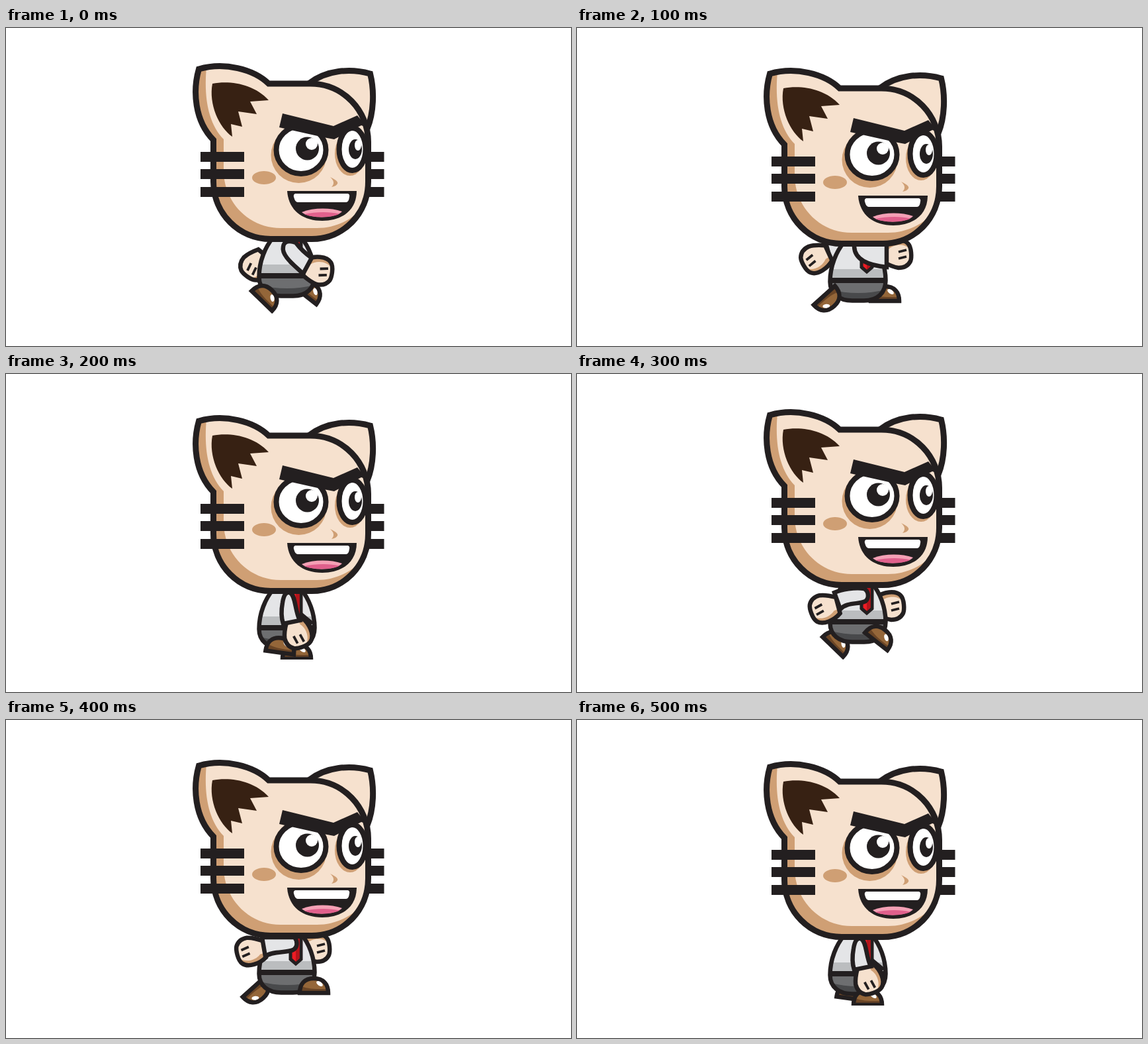
Recreate the animation shown at these times as an HTML page. Size 854 by 480 pixels, loop 600 ms.

```html
<!DOCTYPE html>
<html lang="en">
<head>
<meta charset="utf-8">
<title>Walking cat</title>
<style>
  html, body { margin: 0; width: 100%; height: 100%; overflow: hidden; background: #fff; }
  svg { display: block; width: 100%; height: 100%; }
  .ink { fill: #231f20; }
  .skin { fill: #f6e1ce; }
  .tan { fill: #cf9f74; }
  .shirt { fill: #e4e5e7; }
  .grey { fill: #bbbdbf; }
  .white { fill: #fff; }
  .line { stroke: #231f20; stroke-width: 6.5; }
  .thick { stroke: #231f20; stroke-width: 9; }
  .none { fill: none; }
</style>
</head>
<body>
<svg viewBox="0 0 854 480">
  <defs>
    <clipPath id="floor"><path d="M0 0H854V431H0Z"/></clipPath>
    <path id="eggShape" d="M404 316C392 330 382.500 352 382.500 376C382.500 394 396 404.500 416 404.500H434C454 404.500 466.500 393 466.500 374C466.500 352 458 330 446 316Z"/>
    <clipPath id="egg"><use href="#eggShape"/></clipPath>
    <path id="headShape" d="M397 84H460C510 84 547.500 125 547.500 172V232C547.500 280 510 318.500 462 318.500H400C352 318.500 313.500 280 313.500 232V169C285 140 282 95 291.500 62C330 51 374 62 397 84Z"/>
    <clipPath id="headClip"><use href="#headShape"/></clipPath>

    <g id="shoe">
      <path fill="#946639" d="M3-3C3-16 10-25 24-25C39-25 46-16 46-3Z"/>
      <path fill="#6a4526" d="M3-3C3-8 4-11 6-13C18-8 33-9 46-9V-3Z"/>
      <path class="line none" d="M3-3C3-16 10-25 24-25C39-25 46-16 46-3Z"/>
      <ellipse class="white" cx="33" cy="-17" rx="5.500" ry="3" transform="rotate(35 33 -17)"/>
    </g>

    <path id="fistShape" d="M-21-13C-10-21 8-24 16-16C22-10 22 6 20 11C16 19 8 21 2 21C-6 20-14 16-21 12Z"/>
    <g id="fist">
      <use href="#fistShape" class="skin"/>
      <path class="tan" d="M-21-13C-10-21 8-24 16-16L20-7C10-17-6-14-13-7L-21-6Z"/>
      <use href="#fistShape" class="line none"/>
      <path class="none" stroke="#231f20" stroke-width="3.800" d="M2-3L14-6M2 7L14 4"/>
    </g>

    <g id="torso">
      <g clip-path="url(#egg)">
        <path class="shirt" d="M370 310H480V358H370Z"/>
        <path class="grey" d="M370 357H480V371H370Z"/>
        <path fill="#6d6e70" d="M370 376H480V410H370Z"/>
        <path fill="#48494b" d="M370 384Q425 402 480 384V410H370Z"/>
        <path class="ink" d="M370 370H480V378H370Z"/>
      </g>
      <use href="#eggShape" class="line none"/>
      <path fill="#ed1c24" stroke="#231f20" stroke-width="5" d="M430 312V354L438 361L446 354V312Z"/>
      <path fill="#b5141b" d="M438 312H443.500V353L438 358Z"/>
    </g>

    <g id="head">
      <path class="skin thick" d="M458 83.500C485 63.500 520 60.500 550.500 69C557 95 556 128 546 152Z"/>
      <path class="ink" d="M545 187H571.500V202H545ZM545 213H571.500V228H545ZM545 240H571.500V255H545Z"/>
      <use href="#headShape" class="tan"/>
      <path class="skin" clip-path="url(#headClip)" d="M304 50C298 100 304 142 329 168V215C329 262 366 302 415 302H470C520 302 560 263 560 215V50Z"/>
      <use href="#headShape" class="thick none"/>
      <path fill="#372113" d="M312 84C340 79 375 85 397 109L369 111L379 130L351 126L357 149L340 145L342 164C322 150 306 115 312 84Z"/>
      <path class="ink" d="M294 187H360V202H294ZM294 213H360V228H294ZM294 240H360V255H294Z"/>
      <g class="tan">
        <ellipse cx="390" cy="226" rx="18" ry="10"/>
        <ellipse cx="442.500" cy="192" rx="42" ry="42"/>
        <ellipse cx="520" cy="190" rx="23" ry="33"/>
        <path d="M490 225Q503 231 501 235Q499 239 492 240Q499 233 490 225Z"/>
      </g>
      <g class="white" stroke="#231f20" stroke-width="8">
        <ellipse cx="446" cy="184" rx="37.500" ry="36"/>
        <ellipse cx="523.500" cy="183" rx="20" ry="32"/>
      </g>
      <g class="ink">
        <circle cx="455.500" cy="182" r="17.500"/>
        <ellipse cx="528" cy="183" rx="10" ry="15"/>
      </g>
      <g class="white">
        <circle cx="462" cy="175" r="9"/>
        <ellipse cx="532" cy="177" rx="5" ry="8"/>
      </g>
      <path class="ink" d="M418 129L495 148L531 132L546 150L537 147L496 168L480 165L413 150Z"/>
      <path class="ink" d="M425 246H530C530 275 508 291 478 291C448 291 427 275 425 246Z"/>
      <path class="white" d="M437 250H517Q520 251 519 255Q518 263 514 263H441Q437 263 435 255Q434 251 437 250Z"/>
      <path fill="#f4a0b5" d="M447 278C465 271 490 271 508 277C498 288 458 288 447 278Z"/>
      <path fill="#e0608c" d="M451 281C468 277 490 277 504 280.500C492 287 464 287 451 281Z"/>
    </g>
  </defs>
  <g id="cat"></g>
</svg>
<script>
const STEP = 100;
const bob = [0, 7, 9];

// Shoes as [x, y, angle]: trailing side, then leading side
const feet = [
  [[367, 397, 44], [431, 391, 38]],
  [[390, 385, 138], [441, 415, 0]],
  [[389, 420, 8], [415, 433, 0]]
];

const hanging = {
  near: [441, 392, 75],
  sleeve: "M418 345C420 332 424 329 429 330C438 334 436 355 444 372L419 377C416 368 416 356 418 345Z",
  crease: "M445 362L463 377"
};

const arms = [
  { near: [472, 366, 12], far: [377, 358, 130],
    sleeve: "M419 330C416 344 436 358 449 371L462 347C452 340 444 332 438 324C428 320 420 322 419 330Z" },
  { near: [484, 341, 0], far: [361, 348, 155],
    sleeve: "M419 330C420 350 440 358 468 361V320H419Z",
    farSleeve: "M376 324L385 358L404 324Z" },
  hanging,
  { near: [374, 354, 165], far: [473, 350, 0],
    sleeve: "M389 330L398 355C408 344 426 348 436 343C442 338 441 328 434 324C420 322 400 325 389 330Z" },
  { near: [370, 349, 170], far: [468, 344, 0],
    sleeve: "M387 328L392 357C402 348 424 352 434 347C441 343 441 334 436 328Z" },
  hanging
];

const put = (id, [x, y, angle = 0]) =>
  `<use href="#${id}" transform="translate(${x} ${y}) rotate(${angle})"/>`;
const cloth = d => d ? `<path class="shirt line" d="${d}"/>` : "";

function pose(k) {
  const phase = k % 3, arm = arms[k];
  const nearFoot = k < 3 ? 0 : 1;
  const lift = [0, bob[phase]];
  return `<g clip-path="url(#floor)">` +
    put("shoe", feet[phase][1 - nearFoot]) +
    cloth(arm.farSleeve) +
    (arm.far ? put("fist", arm.far) : "") +
    put("torso", lift) +
    put("shoe", feet[phase][nearFoot]) +
    (arm.crease ? `<path class="line none" d="${arm.crease}"/>` : "") +
    put("fist", arm.near) +
    cloth(arm.sleeve) +
    `</g>` + put("head", lift);
}

const cat = document.getElementById("cat");
let shown = -1;

function draw(now) {
  const k = Math.floor(Math.max(0, now) / STEP) % 6;
  if (k !== shown) cat.innerHTML = pose(shown = k);
  requestAnimationFrame(t => draw(t - start));
}

const start = performance.now();
draw(0);
</script>
</body>
</html>
```
